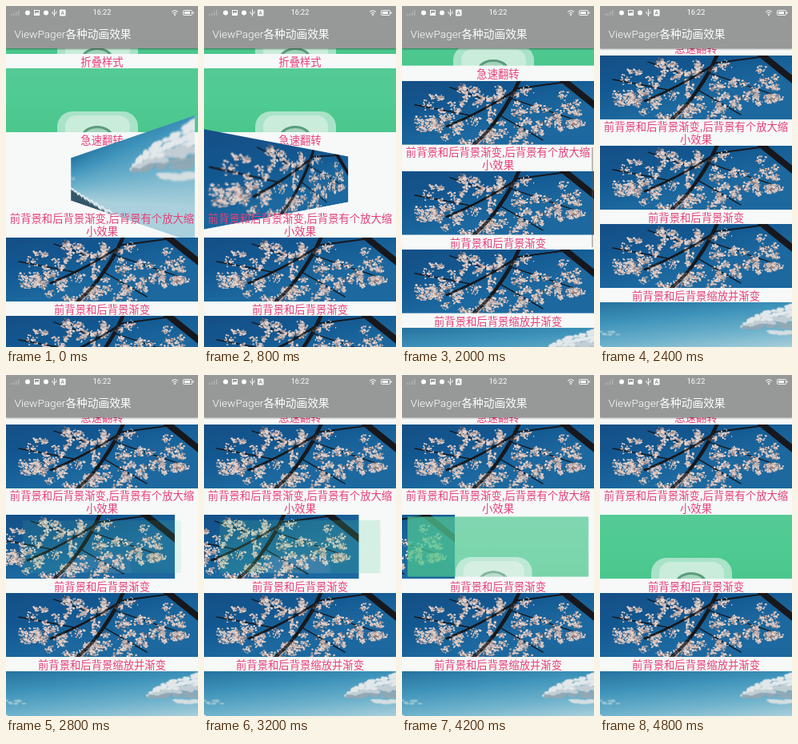
Animation, 240 px wide and 427 px high, one loop 5000 ms. Source, as an HTML page with a canvas:

```html
<!DOCTYPE html>
<html lang="zh-CN">
<head>
<meta charset="utf-8">
<title>ViewPager</title>
<style>
  html, body { margin: 0; width: 100%; height: 100%; overflow: hidden; background: #f6f9f8; }
  #stage { position: relative; width: 240px; height: 427px; overflow: hidden; background: #f6f9f8;
    font-family: Roboto, "Noto Sans CJK SC", "Noto Sans CJK", sans-serif; }
  #list { position: absolute; left: 0; top: 0; width: 240px; height: 570px; }
  .pager { position: absolute; left: 0; width: 240px; height: 80px; }
  .clip { overflow: hidden; }
  canvas { position: absolute; left: 0; top: 0; width: 240px; height: 80px; }
  .label { position: absolute; left: 0; width: 240px; text-align: center; color: #e83e79;
    font: 300 13.33px/16px "Noto Sans CJK SC", "Noto Sans CJK", sans-serif; white-space: pre; }
  #bar { position: absolute; left: 237px; top: 177px; width: 2px; height: 125px; background: rgba(90, 90, 90, .4); }
  #head { position: absolute; left: 0; top: 0; width: 240px; height: 53px; background: #979898;
    box-shadow: 0 1px 2px rgba(0, 0, 0, .4); color: #fff; }
  #head svg { position: absolute; left: 0; top: 0; }
  #clock { position: absolute; left: 0; width: 240px; top: 3px; text-align: center; font-size: 9px; line-height: 11px; }
  #name { position: absolute; left: 10.5px; top: 25px; font-size: 13.7px; font-weight: 300; line-height: 20px; white-space: pre; }
</style>
</head>
<body>
<div id="stage">
  <div id="list">
    <div class="pager" style="top:-20px"><canvas data-art="mint"></canvas></div>
    <div class="label" style="top:62px">折叠样式</div>
    <div class="pager" style="top:78px"><canvas data-art="mint"></canvas></div>
    <div class="label" style="top:160px">急速翻转</div>
    <div class="pager" style="top:177px">
      <canvas id="flipSky" data-art="sky"></canvas>
      <canvas id="flipTree" data-art="tree"></canvas>
    </div>
    <div class="label" style="top:258px">前背景和后背景渐变,后背景有个放大缩
小效果</div>
    <div class="pager clip" style="top:290px">
      <canvas id="front" data-art="tree"></canvas>
      <canvas id="back" data-art="mint"></canvas>
    </div>
    <div class="label" style="top:372px">前背景和后背景渐变</div>
    <div class="pager" style="top:388px"><canvas data-art="tree"></canvas></div>
    <div class="label" style="top:470px">前背景和后背景缩放并渐变</div>
    <div class="pager" style="top:486px"><canvas data-art="sky"></canvas></div>
  </div>
  <div id="bar"></div>
  <div id="head">
    <svg width="240" height="18" fill="#fff">
      <path d="M6 12v-2h1.5v2zM9 12V9h1.5v3zM12 12V7h1.5v5zM15 12V5h1.5v7z" opacity=".25"/>
      <circle cx="27" cy="8.5" r="3"/>
      <path d="M35 5h7v7h-7zM36 6v4l2-2 1 1 1-1 1 1V6z" fill-rule="evenodd"/>
      <circle cx="50" cy="8.5" r="3"/>
      <path d="M60.5 4v9M58 7v2l2.5 2M63 6.5v2l-2.5 1.5" fill="none" stroke="#fff" stroke-width=".9"/>
      <rect x="67" y="4.5" width="7.5" height="8" rx="1"/>
      <path d="M69 11l1.7-5 1.7 5M69.5 9.5h2.5" fill="none" stroke="#888" stroke-width=".8"/>
      <path d="M207 7.500q4-3.500 8 0M208.700 9.300q2.300-2 4.600 0" fill="none" stroke="#fff"/>
      <circle cx="211" cy="11" r="1"/>
      <rect x="221.5" y="5.5" width="11" height="6" rx="1" fill="none" stroke="#fff" stroke-width=".9"/>
      <path d="M223 7h7v3h-7zM233.5 7.5h1.3v2h-1.3z"/>
    </svg>
    <div id="clock">16:22</div>
    <div id="name">ViewPager各种动画效果</div>
  </div>
</div>
<script>
const $ = id => document.getElementById(id);
const LOOP = 5000, STEP = 200;

function rng(seed) {
  return () => (seed = (seed * 16807) % 2147483647) / 2147483647;
}

function fill(c, stops, slant = 0) {
  const g = c.createLinearGradient(0, 0, slant, 80);
  stops.forEach((s, i) => g.addColorStop(i / (stops.length - 1), s));
  c.fillStyle = g;
  c.fillRect(0, 0, 240, 80);
}

function ellipse(c, x, y, rx, ry, color) {
  c.fillStyle = color;
  c.beginPath();
  c.ellipse(x, y, rx, ry, 0, 0, Math.PI * 2);
  c.fill();
}

function box(c, x, y, w, r, color) {
  c.fillStyle = color;
  c.beginPath();
  c.roundRect(x, y, w, 60, r);
  c.fill();
}

// Curved branch from (x, y) to (x2, y2), bent sideways
function limb(c, width, x, y, x2, y2, bend = 0) {
  c.lineWidth = width;
  c.beginPath();
  c.moveTo(x, y);
  c.quadraticCurveTo((x + x2) / 2 + bend, (y + y2) / 2 + bend, x2, y2);
  c.stroke();
}

const art = {
  mint(c) {
    fill(c, ['#55ca96', '#4fcb93', '#4bc78e']);
    box(c, 64, 54, 101, 19, '#a9e3c8');
    box(c, 74, 59, 81, 14, '#c9ecdb');
    ellipse(c, 114, 86, 20, 14, '#5a9c7c');
    ellipse(c, 114, 87, 17, 12, '#a3d3bb');
  },

  sky(c) {
    fill(c, ['#26739f', '#3f94bb', '#6cb1cb', '#a9d0dc'], 8);
    const r = rng(41);
    c.filter = 'blur(.8px)';
    for (let i = 0; i < 150; i++) {
      const k = r(), depth = r();
      const top = 30 - 27 * Math.sqrt(k);
      ellipse(c, 181 + 62 * k, top + depth * (32 - top), 2 + 4 * r(), 1 + 1.6 * r(),
        depth < .5 ? '#e3e8ea' : depth < .8 ? '#c3ced4' : '#93a9b5');
    }
    for (let i = 0; i < 24; i++) ellipse(c, 209 + 32 * r(), 36 + 4 * r(), 4, 1.3, '#d5dfe2');
    for (let i = 0; i < 10; i++) ellipse(c, 24 * r(), 36 + 5 * r(), 3, 1, '#9cc8d4');
    c.filter = 'none';
    // Snowy ridge falling to the right
    for (let x = 0; x < 170; x += .5) {
      const top = 54 + 26 * Math.pow(x / 170, .8) + Math.sin(x * .4);
      c.fillStyle = '#dce8ec';
      c.fillRect(x, top, .6, 80 - top);
      c.fillStyle = '#34566a';
      c.fillRect(x, top + 3 + 3 * r(), .6, 26);
    }
  },

  tree(c) {
    fill(c, ['#164f86', '#135891', '#1c689f'], 20);
    c.strokeStyle = '#17181d';
    c.lineCap = 'round';
    const trunk = () => {
      limb(c, 4.5, 147, -2, 122, 43, 2);
      limb(c, 4, 122, 43, 87, 82, 3);
      limb(c, 2.6, 138, 14, 56, 57, 3);
    };
    trunk();
    limb(c, 8, 198, -4, 244, 33);
    limb(c, 2, 140, 10, 200, 2);
    limb(c, 1.4, 118, 28, 60, 8);
    limb(c, 1.4, 90, 44, 16, 30);
    limb(c, 1.4, 136, 22, 214, 48);
    limb(c, 1.4, 122, 43, 176, 74);

    const r = rng(977);
    const tones = ['#e6d6d1', '#d3c0bb', '#b5a19e', '#8d7d7e', '#55505a'];
    for (let n = 0; n < 105; n++) {
      const turn = r() * 6.283, far = Math.sqrt(r());
      const x = 118 + 108 * far * Math.cos(turn), y = 43 + 38 * far * Math.sin(turn);
      const size = 3 + 4.5 * r();
      for (let i = 0; i < 24; i++) {
        const a = r() * 6.283, d = r() * size;
        ellipse(c, x + Math.cos(a) * d * 1.2, y + Math.sin(a) * d,
          .6 + 1.1 * r(), .5 + r(), tones[Math.floor(r() * Math.sqrt(r()) * 5)]);
      }
    }
    c.globalAlpha = .75;
    trunk();
  }
};

document.querySelectorAll('canvas').forEach(el => {
  el.width = 480;
  el.height = 160;
  const c = el.getContext('2d');
  c.scale(2, 2);
  art[el.dataset.art](c);
});

const clamp = u => Math.min(1, Math.max(0, u));
const smooth = u => u * u * (3 - 2 * u);
const phase = (t, from, length) => clamp((t - from) / length);

function flip(el, angle, shown) {
  el.style.visibility = shown ? 'visible' : 'hidden';
  el.style.transform = angle ? `perspective(210px) rotateY(${angle}deg)` : 'none';
}

function draw(t) {
  const angle = Math.max(0, 119 - .0925 * t);
  flip($('flipSky'), angle - 180, angle > 90);
  flip($('flipTree'), angle, angle <= 90);

  const scroll = 115 * smooth(phase(t, 1600, 612));
  $('list').style.transform = `translateY(${-scroll}px)`;
  $('bar').style.opacity = t >= 1800 && t < 2400 ? 1 : 0;

  // Slow drag, then release
  const drag = 1 - (1 - phase(t, 2400, 1200)) ** 2;
  const p = .217 * drag + .783 * smooth(phase(t, 3600, 1000));
  $('front').style.transform = `translateX(${-240 * p}px)`;
  $('back').style.transform = `scale(${.8 + .2 * p})`;
  $('back').style.opacity = p;
}

const start = performance.now();
function tick(now) {
  const t = Math.max(0, now - start) % LOOP;
  draw(Math.floor(t / STEP) * STEP);
  requestAnimationFrame(tick);
}
draw(0);
requestAnimationFrame(tick);
</script>
</body>
</html>
```
